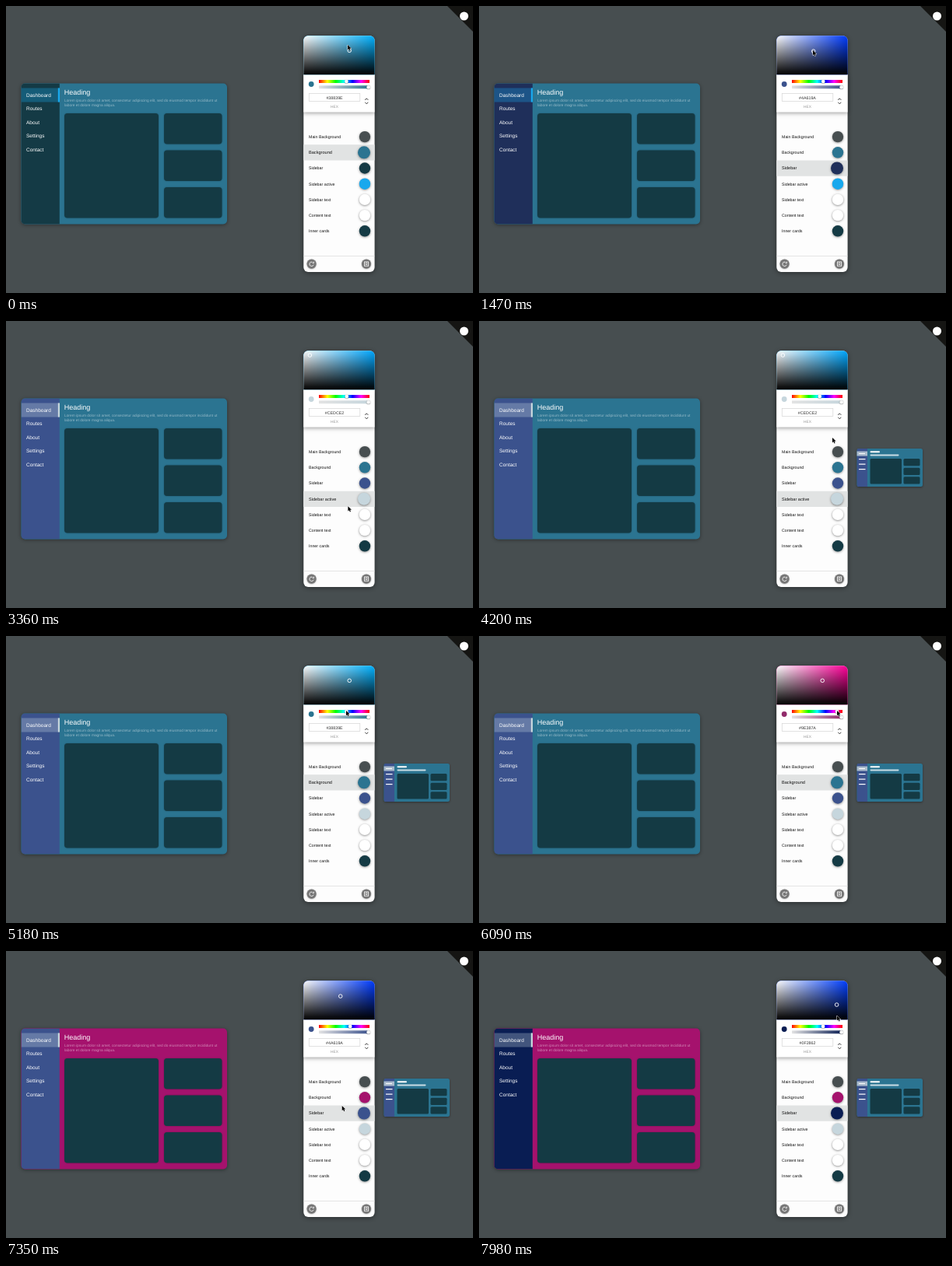
Recreate the animation shown at these times as an HTML page with a canvas. Size 600 by 369 pixels, loop 8000 ms.

```html
<!DOCTYPE html>
<html lang="en">
<head>
<meta charset="utf-8">
<title>Theme picker</title>
<style>
  html, body { margin: 0; width: 100%; height: 100%; overflow: hidden; background: #474e50; }
  canvas { display: block; width: 100vw; height: 100vh; }
</style>
</head>
<body>
<canvas id="stage"></canvas>
<script>
const W = 600, H = 369, LOOP = 8000, STEP = 70;
const canvas = document.getElementById('stage');
const ctx = canvas.getContext('2d');
const FONT = '"Liberation Sans", Arial, sans-serif';

// Timeline: cursor stops as [time, x, y].
const cursorPath = [
  [0, 439, 50], [250, 440, 58], [700, 437, 206], [800, 437, 206],
  [1020, 442, 96], [1120, 442, 96], [1350, 429, 57], [1600, 429, 57],
  [2050, 430, 227], [2150, 430, 227], [2480, 427, 57], [2650, 427, 57],
  [2950, 390, 44], [3050, 390, 44], [3550, 463, 331], [3760, 463, 331],
  [4200, 454, 150], [4580, 430, 187], [4720, 430, 187], [5120, 437, 96],
  [5200, 437, 96], [5850, 460, 96], [6200, 460, 96], [6600, 458, 53],
  [6780, 458, 53], [7180, 430, 207], [7300, 430, 207], [7640, 459, 69],
  [7780, 459, 69], [7980, 460, 83]
];
// Picker values as [start, end, colour]; equal times are hard changes.
const pickerPath = [
  [0, 0, '38839E'], [750, 750, '1D4954'], [1050, 1050, '1D2D54'],
  [1380, 1380, '4A619A'], [2100, 2100, '22B3F0'], [2500, 2500, '51889C'],
  [2650, 2950, 'CEDCE2'], [4650, 4650, '38839E'], [5200, 5850, '9E387A'],
  [6720, 6720, 'B01B7C'], [7250, 7250, '4A619A'], [7700, 7700, '0F2862']
];
const selection = [[0, 1], [750, 2], [2100, 3], [4650, 1], [7250, 2]];
const themePath = {
  back: [[0, '38839E'], [6200, '9E387A'], [6720, 'B01B7C']],
  side: [[0, '1D4954'], [1080, '1D2D54'], [1380, '4A619A'], [7700, '0F2862']],
  active: [[0, '22B3F0'], [2950, 'CEDCE2']]
};
const SAVE_TIME = 3700, FADE = 250;
const PAGE = [71, 78, 80], CARD = [20, 58, 68], WHITE = [255, 255, 255];

const clamp = v => Math.max(0, Math.min(1, v));
const smooth = v => { v = clamp(v); return v * v * (3 - 2 * v); };
const mix = (a, b, k) => a.map((v, i) => v + (b[i] - v) * k);
const css = (c, a = 1) => `rgba(${c.map(Math.round).join(',')},${a})`;
const parse = hex => [0, 2, 4].map(i => parseInt(hex.slice(i, i + 2), 16));
const toHex = c => '#' + c.map(v => Math.round(v).toString(16).padStart(2, '0')).join('').toUpperCase();
const shade = c => c.map(v => 255 * (v / 255) ** 1.18); // display profile
const lastIndex = (list, t) => list.findLastIndex(e => e[0] <= t);

function toHsv([r, g, b]) {
  const max = Math.max(r, g, b), d = max - Math.min(r, g, b);
  const h = !d ? 0 : max === r ? (g - b) / d : max === g ? 2 + (b - r) / d : 4 + (r - g) / d;
  return [(h * 60 + 360) % 360, max ? d / max : 0, max / 255];
}
function fromHsv([h, s, v]) {
  return [5, 3, 1].map(n => {
    const k = (n + h / 60) % 6;
    return 255 * v * (1 - s * clamp(Math.min(k, 4 - k)));
  });
}

function themeColor(list, t) {
  const i = lastIndex(list, t), now = shade(parse(list[i][1]));
  return i ? mix(shade(parse(list[i - 1][1])), now, smooth((t - list[i][0]) / FADE)) : now;
}
function pickerHsv(t) {
  const i = lastIndex(pickerPath, t), [start, end, hex] = pickerPath[i];
  const now = toHsv(parse(hex));
  return end > start ? mix(toHsv(parse(pickerPath[i - 1][2])), now, smooth((t - start) / (end - start))) : now;
}
function cursorAt(t) {
  const i = lastIndex(cursorPath, t), a = cursorPath[i], b = cursorPath[i + 1] || a;
  return mix(a, b, smooth((t - a[0]) / (b[0] - a[0] || 1))).slice(1);
}

function box(x, y, w, h, fill, r = 0) {
  ctx.beginPath();
  ctx.roundRect(x, y, w, h, r);
  ctx.fillStyle = fill;
  ctx.fill();
}
function disc(x, y, r, fill) {
  ctx.beginPath();
  ctx.arc(x, y, r, 0, 7);
  ctx.fillStyle = fill;
  ctx.fill();
}
function line(points, color, width) {
  ctx.beginPath();
  points.forEach(p => ctx.lineTo(...p));
  ctx.strokeStyle = color;
  ctx.lineWidth = width;
  ctx.stroke();
}
function text(str, x, y, size, fill, align = 'left') {
  ctx.font = `${size}px ${FONT}`;
  ctx.textAlign = align;
  ctx.fillStyle = fill;
  ctx.fillText(str, x, y);
}
function shadowed(blur, alpha, dy, draw) {
  ctx.save();
  ctx.shadowColor = `rgba(0,0,0,${alpha})`;
  ctx.shadowBlur = blur * scale;
  ctx.shadowOffsetY = dy * scale;
  draw();
  ctx.restore();
}
function clipped(x, y, w, h, r, draw) {
  ctx.save();
  ctx.beginPath();
  ctx.roundRect(x, y, w, h, r);
  ctx.clip();
  draw();
  ctx.restore();
}
function gradient(x0, y0, x1, y1, colors) {
  const g = ctx.createLinearGradient(x0, y0, x1, y1);
  colors.forEach((c, i) => g.addColorStop(i / (colors.length - 1), c));
  return g;
}

function drawPreview({ back, side, active }) {
  shadowed(5, .4, 1, () => box(19.5, 99.5, 264.5, 181, css(back), 5));
  clipped(19.5, 99.5, 264.5, 181, 5, () => {
    box(19.5, 99.5, 49.3, 181, css(side));
    box(19.5, 105.5, 49.3, 18, css(active, .3));
    box(66.8, 105.5, 2.2, 18, css(active));
  });
  ['Dashboard', 'Routes', 'About', 'Settings', 'Contact'].forEach((label, i) =>
    text(label, 26, 116.9 + i * 17.4, 6.5, '#fff'));
  text('Heading', 74.8, 114.3, 9, '#fff');
  const soft = 'rgba(255,255,255,.5)';
  text('Lorem ipsum dolor sit amet, consectetur adipiscing elit, sed do eiusmod tempor incididunt ut', 75, 123.2, 4.84, soft);
  text('labore et dolore magna aliqua.', 75, 129.2, 4.84, soft);
  shadowed(2, .3, 0, () => {
    box(75, 138, 121, 134.5, css(CARD), 4);
    [138, 185.5, 233].forEach(y => box(203, y, 74.5, 39.5, css(CARD), 4));
  });
}

function drawThumbnail(t) {
  const back = shade(parse('38839E')), side = shade(parse('4A619A')), active = shade(parse('CEDCE2'));
  ctx.save();
  ctx.globalAlpha = smooth((t - SAVE_TIME) / FADE);
  shadowed(3, .4, 1, () => box(485.5, 164, 84.5, 49, css(back), 2.5));
  clipped(485.5, 164, 84.5, 49, 2.5, () => box(485.5, 164, 13.5, 49, css(side)));
  box(485.5, 167.5, 13.5, 6, css(active, .8));
  box(488, 170, 8, 1, '#fff');
  [177, 183.5, 190].forEach(y => box(488, y, 8.5, 1.2, '#fff'));
  box(502.5, 167.2, 12.5, 2, '#fff', 1);
  box(502.5, 171.6, 37, 1.8, 'rgba(255,255,255,.75)', .8);
  box(502.5, 177, 40.5, 32.5, css(CARD), 1.5);
  [177, 188.7, 200.3].forEach(y => box(545.5, y, 21, 9.3, css(CARD), 1.5));
  ctx.restore();
}

function drawPicker(hsv) {
  const [h, s, v] = hsv, color = fromHsv(hsv), shown = shade(color);
  const hue = css(shade(fromHsv([h, 1, 1])));
  shadowed(5, .35, 1, () => box(382.3, 88, 91.3, 48.5, '#fff'));
  clipped(382.3, 38.3, 91.3, 50, [6, 6, 0, 0], () => {
    box(382, 38, 92, 51, hue);
    box(382, 38, 92, 51, gradient(382, 0, 473.6, 0, ['#fff', 'rgba(255,255,255,0)']));
    box(382, 38, 92, 51, gradient(0, 38, 0, 88.3, ['rgba(0,0,0,0)', '#000']));
  });
  ctx.beginPath();
  ctx.arc(382.3 + s * 91.3, 38.3 + (1 - v) * 50, 2.3, 0, 7);
  ctx.strokeStyle = '#fff';
  ctx.lineWidth = .9;
  ctx.stroke();

  disc(392.2, 100.5, 3.4, css(shown));
  box(402, 95, 65, 4, gradient(402, 0, 467, 0, ['#f00', '#ff0', '#0f0', '#0ff', '#00f', '#f0f', '#f00']));
  clipped(402, 102.3, 65, 4, 0, () => {
    box(402, 102, 65, 5, '#fff');
    for (let i = 0; i < 66; i++) box(402 + (i >> 1) * 2, 102.3 + ((i + (i >> 1)) % 2) * 2, 2, 2, '#e0e0e0');
    box(402, 102, 65, 5, gradient(402, 0, 467, 0, [css(shown, 0), css(shown)]));
  });
  shadowed(1.5, .5, .4, () => {
    disc(402 + h / 360 * 65, 97, 2.4, '#f8f8f8');
    disc(465.7, 104.3, 2.4, '#f8f8f8');
  });

  ctx.strokeStyle = '#d6d6d6';
  ctx.lineWidth = .7;
  ctx.strokeRect(389.3, 112.6, 65.5, 9.8);
  text(toHex(color), 422, 119.6, 5.3, '#333', 'center');
  text('HEX', 422, 131, 4.8, '#969696', 'center');
  line([[461.3, 120.8], [463.3, 118.8], [465.3, 120.8]], '#333', 1);
  line([[461.3, 123.8], [463.3, 125.8], [465.3, 123.8]], '#333', 1);
}

function drawRows(theme, selected) {
  const rows = [
    ['Main Background', PAGE], ['Background', theme.back], ['Sidebar', theme.side],
    ['Sidebar active', theme.active], ['Sidebar text', WHITE], ['Content text', WHITE], ['Inner cards', CARD]
  ];
  rows.forEach(([label, color], i) => {
    const y = 168.1 + i * 20.2, on = i === selected;
    if (on) box(382.3, y - 10, 91.3, 20.2, '#e1e3e3');
    text(label, 389, y + 1.9, on ? 5.6 : 5.3, '#111');
    shadowed(3, .45, .8, () => disc(on ? 460 : 461, y, on ? 8 : 7.2, css(color)));
  });
}

function drawFooter() {
  box(382.3, 321, 91.3, .8, '#dcdcdc');
  shadowed(2, .3, .5, () => [392.6, 463].forEach(x => disc(x, 331.6, 6.1, '#777')));
  ctx.beginPath();
  ctx.arc(392.6, 331.8, 2.7, .3, 5.2);
  ctx.strokeStyle = '#fff';
  ctx.lineWidth = .8;
  ctx.stroke();
  line([[393.6, 330.3], [395.5, 330.6], [395.4, 328.6]], '#fff', .8);
  ctx.strokeRect(460.4, 329, 5.2, 5.2);
  line([[463, 329], [463, 332.8]], '#fff', .8);
  line([[461.6, 331.4], [463, 332.8], [464.4, 331.4]], '#fff', .8);
}

function drawCursor(x, y) {
  ctx.save();
  ctx.translate(x, y);
  ctx.beginPath();
  [[0, 0], [0, 6.4], [1.5, 5.1], [2.5, 7.4], [3.6, 6.9], [2.6, 4.7], [4.6, 4.6]].forEach(p => ctx.lineTo(...p));
  ctx.closePath();
  ctx.strokeStyle = '#fff';
  ctx.lineWidth = 1;
  ctx.stroke();
  ctx.fillStyle = '#000';
  ctx.fill();
  ctx.restore();
}

function drawCorner() {
  ctx.beginPath();
  [[567, 0], [600, 0], [600, 33]].forEach(p => ctx.lineTo(...p));
  ctx.fillStyle = '#151513';
  ctx.fill();
  disc(588.5, 13, 5.5, '#fff');
}

let scale = 1;
function render(t) {
  const dpr = window.devicePixelRatio || 1;
  const w = Math.round(innerWidth * dpr), h = Math.round(innerHeight * dpr);
  if (canvas.width !== w || canvas.height !== h) { canvas.width = w; canvas.height = h; }
  scale = w / W;
  ctx.setTransform(scale, 0, 0, h / H, 0, 0);
  ctx.textRendering = 'geometricPrecision';

  const theme = {};
  for (const key in themePath) theme[key] = themeColor(themePath[key], t);

  box(0, 0, W, H, css(PAGE));
  drawCorner();
  drawPreview(theme);
  if (t >= SAVE_TIME) drawThumbnail(t);
  shadowed(6, .45, 1, () => box(382.3, 38.3, 91.3, 303.7, '#fdfdfd', 6));
  drawPicker(pickerHsv(t));
  drawRows(theme, selection[lastIndex(selection, t)][1]);
  drawFooter();
  drawCursor(...cursorAt(t));
}

const begin = performance.now();
function frame() {
  const t = (performance.now() - begin) % LOOP;
  render(Math.floor(t / STEP) * STEP);
  requestAnimationFrame(frame);
}
frame();
</script>
</body>
</html>
```
